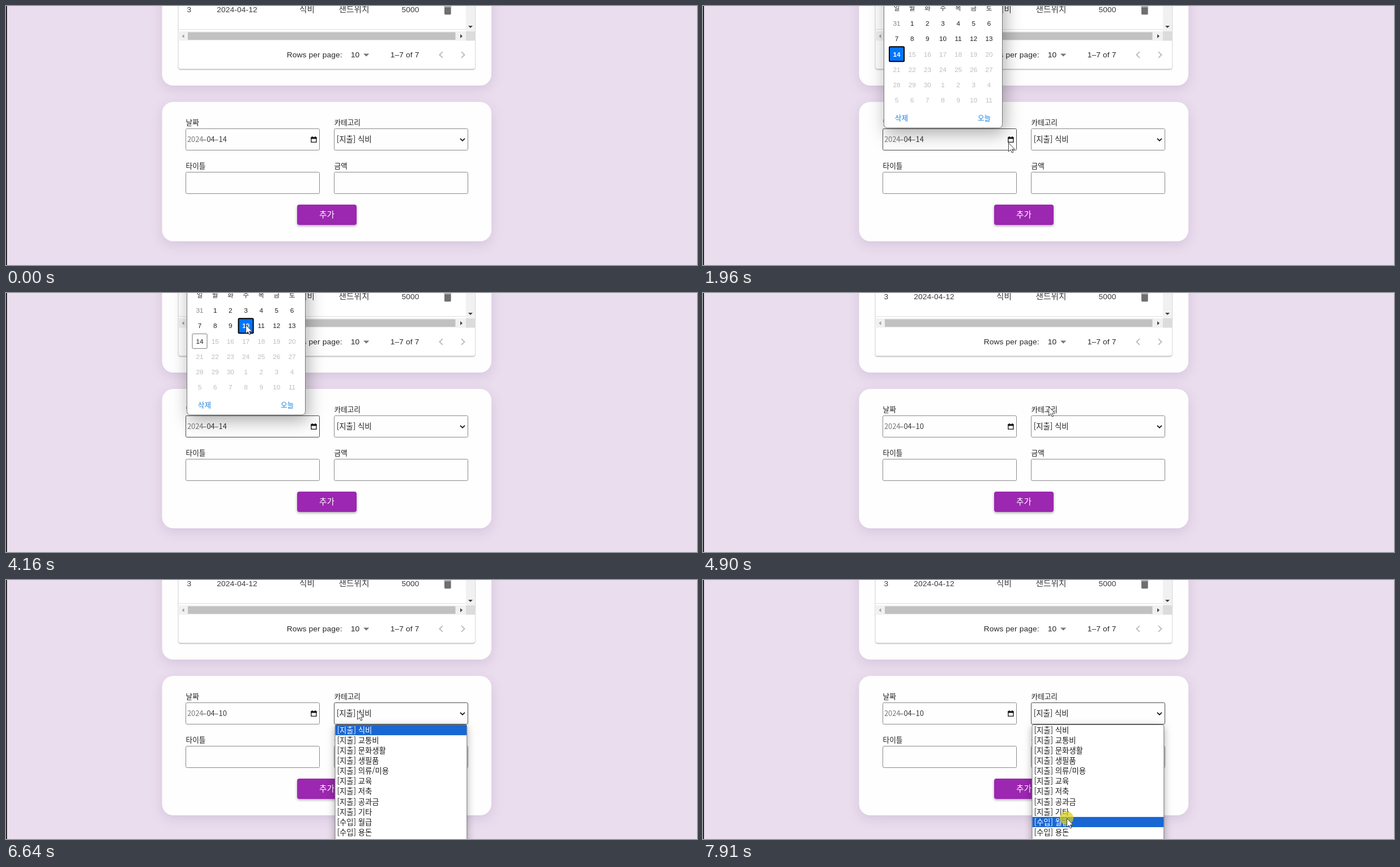
These frames come from a looping animation (1220x459 px, 8000 ms). An HTML page:

```html
<!DOCTYPE html>
<html lang="ko">
<head>
<meta charset="utf-8">
<title>가계부</title>
<style>
  html, body { margin: 0; width: 100%; height: 100%; overflow: hidden; background: #eadded; }
  svg { display: block; }
  text { font-family: "Noto Sans CJK KR", "Noto Sans CJK", sans-serif; font-size: 13.33px; fill: #1c1c1c; white-space: pre; }
  .ui { font-family: "Liberation Sans", Arial, sans-serif; font-size: 13.7px; letter-spacing: .01071em; fill: #262626; }
  .cell { font-size: 14.6px; letter-spacing: .15px; fill: #3a3a3a; }
  .row { fill: #3a3a3a; }
  .label { font-size: 12.6px; }
  .date { font-size: 12.8px; font-weight: 300; fill: #333; }
  .day { font-family: "Liberation Sans", Arial, sans-serif; font-size: 11.7px; text-anchor: middle; }
  .week { font-size: 11.6px; text-anchor: middle; fill: #333; }
  .link { font-size: 12.6px; fill: #1e82dc; }
  .card { fill: #fefefe; filter: drop-shadow(0 6px 10px rgba(80, 40, 120, .13)); }
  .paper { fill: #fff; filter: drop-shadow(0 1px 1px rgba(0, 0, 0, .4)); }
  .button { fill: #9c27b0; filter: drop-shadow(0 2px 2px rgba(0, 0, 0, .32)); }
  .field { fill: #fefefe; stroke: #8a8a8a; }
  .popup { fill: #fff; stroke: #777; }
  #calendar { filter: drop-shadow(4px 10px 15px rgba(0, 0, 0, .32)); }
  #dropdown { filter: drop-shadow(0 4px 7px rgba(0, 0, 0, .32)); }
</style>
</head>
<body>
<svg id="stage" width="1220" height="459" viewBox="0 0 1220 459">
  <rect width="1220" height="459" fill="#eadded"/>
  <rect width="1.6" height="459" fill="#000"/>

  <rect class="card" x="275.5" y="-60" width="581.5" height="201" rx="20"/>
  <rect class="paper" x="304.5" y="-40" width="523.5" height="151.5" rx="4"/>
  <text class="ui row" x="319.6" y="11">3</text>
  <text class="ui row" x="372.3" y="11">2024-04-12</text>
  <text class="cell" x="518" y="11">식비</text>
  <text class="cell" x="587.4" y="11">샌드위치</text>
  <text class="ui row" x="698.4" y="11">5000</text>
  <path transform="translate(768.2 -5) scale(.97)" fill="#6f6f6f"
    d="M6 19c0 1.1.9 2 2 2h8c1.1 0 2-.9 2-2V7H6zM19 4h-3.5l-1-1h-5l-1 1H5v2h14z"/>
  <path d="M304.5 41.5H812" stroke="#e0e0e0"/>
  <path d="M812 0h16v45h-16zM304.5 45H812v16.5H304.5z" fill="#f1f1f1"/>
  <rect x="812" y="45" width="16" height="16.5" fill="#dcdcdc"/>
  <rect x="321" y="46.5" width="472.5" height="13.5" fill="#c1c1c1"/>
  <path d="M314.5 50v7l-4-3.5z" fill="#a3a3a3"/>
  <path d="M802 50v7l4-3.5zM816 35h8l-4 4z" fill="#404040"/>
  <text class="ui" x="495.8" y="91.3">Rows per page:</text>
  <text class="ui" x="608.8" y="91">10</text>
  <path d="M631 84.5h10.2l-5.1 5z" fill="#757575"/>
  <text class="ui" x="678.8" y="91.3">1–7 of 7</text>
  <path d="M771 81.2l-5.6 5.3 5.6 5.3M804 81.2l5.6 5.3-5.6 5.3" fill="none" stroke="#bababa" stroke-width="1.8"/>

  <rect class="card" x="275.5" y="170" width="581.5" height="247" rx="20"/>
  <text class="label" x="317.6" y="211.4">날짜</text>
  <text class="label" x="579.6" y="211.4">카테고리</text>
  <text class="label" x="317.6" y="287.8">타이틀</text>
  <text class="label" x="579.6" y="287.8">금액</text>
  <g id="fields"></g>
  <text class="date" y="241.3"><tspan x="320" fill="#777">2024</tspan><tspan x="347.3">–</tspan><tspan x="354.4">04</tspan><tspan x="368.3">–</tspan><tspan id="dayPart" x="375.6">14</tspan></text>
  <path d="M538.9 233.2h9v8.2h-9z" fill="none" stroke="#111" stroke-width="1.3"/>
  <path d="M538.3 232.4h10.2v3h-10.2zM540 231h1.4v2H540zM545.4 231h1.4v2h-1.4z" fill="#111"/>
  <text x="583.8" y="241">[지출] 식비</text>
  <path d="M802 234.8l4 4 4-4" fill="none" stroke="#111" stroke-width="1.8"/>
  <rect class="button" x="514" y="352" width="105" height="36" rx="4"/>
  <text class="cell" x="566.5" y="374.8" text-anchor="middle" style="fill:#fff">추가</text>

  <g id="calendar">
    <rect class="popup" x="319.5" y="-60" width="209" height="276" rx="6"/>
    <text class="link" x="338.8" y="203">삭제</text>
    <text class="link" x="485" y="203">오늘</text>
  </g>
  <g id="dropdown"><rect class="popup" x="581" y="256.5" width="232.8" height="230" rx="3"/></g>
  <circle id="press" r="12" fill="#d8ce14" fill-opacity=".72"/>
  <path id="cursor" d="M.5.5V16l3.6-3.3 2.3 5.4 2.4-1-2.3-5.2h4.9z" fill="#fff" stroke="#2a2a2a" stroke-width=".9" stroke-linejoin="round"/>
</svg>
<script>
const LOOP = 8000;
const ROW_TOP = 257, ROW_H = 18.1;
const CELL = 27.17, COL_X = 342, DAY_Y = 31;
const TODAY = 14, PICK = 10;

const $ = id => document.getElementById(id);
function add(parent, tag, attrs, text) {
  const el = document.createElementNS('http://www.w3.org/2000/svg', tag);
  for (const key in attrs) el.setAttribute(key, attrs[key]);
  if (text !== undefined) el.textContent = text;
  parent.appendChild(el);
  return el;
}
const show = (el, on) => el.setAttribute('visibility', on ? 'visible' : 'hidden');

const [dateField, selectField] = [[317.5, 217.5], [579.5, 217.5], [317.5, 294.5], [579.5, 294.5]]
  .map(([x, y]) => add($('fields'), 'rect', { class: 'field', x, y, width: 236, height: 38, rx: 2 }));

[...'일월화수목금토'].forEach((name, i) =>
  add($('calendar'), 'text', { class: 'week', x: COL_X + i * CELL, y: 7.5 }, name));

// Cell n holds day n of the month; cell 0 is the last day before it.
const days = Array.from({ length: 42 }, (_, n) => {
  const x = COL_X + (n % 7) * CELL, y = DAY_Y + Math.floor(n / 7) * CELL;
  const box = add($('calendar'), 'rect', { x: x - 13, y: y - 13, width: 26, height: 26, rx: 1.5 });
  const label = add($('calendar'), 'text', { class: 'day', x, y: y + 4.2 }, n === 0 ? 31 : n > 30 ? n - 30 : n);
  return { n, x, y, box, label };
});

const options = ['식비', '교통비', '문화생활', '생필품', '의류/미용', '교육', '저축', '공과금', '기타', '월급', '용돈']
  .map((name, i) => {
    const y = ROW_TOP + i * ROW_H;
    const bar = add($('dropdown'), 'rect', { x: 581.5, y, width: 231.8, height: ROW_H, fill: '#1967d2' });
    const label = add($('dropdown'), 'text', { x: 584.5, y: y + 13.8 }, `[${i < 9 ? '지출' : '수입'}] ${name}`);
    return { bar, label };
  });

const smooth = u => u * u * (3 - 2 * u);
const brisk = u => .6 * smooth(u) + .4 * u;
const out = u => u * (2 - u);

// start, end, target x, target y, easing
const moves = [
  [580, 1370, 539, 242, smooth],
  [2570, 3100, 427, 37, smooth],
  [3100, 3350, 424, 50, smooth],
  [3450, 3580, 423, 56, smooth],
  [4570, 4900, 610, 201, brisk],
  [4900, 5300, 620, 231, out],
  [6640, 7100, 643, 386, brisk],
  [7100, 7430, 643, 421, out],
  [7450, 7490, 642, 422, smooth]
];
const presses = [[1650, 1860], [3950, 4160], [5540, 5780], [7910, LOOP]];

function pointer(t) {
  let x = 1102, y = 455;
  for (const [start, end, toX, toY, ease] of moves) {
    if (t < start) break;
    const k = ease(Math.min(1, (t - start) / (end - start)));
    x += (toX - x) * k;
    y += (toY - y) * k;
  }
  return [x, y];
}

// Value of the last [time, value] step reached.
const stepAt = (t, steps) => steps.reduce((v, [at, value]) => t >= at ? value : v, 0);

function setFade(el, opacity) {
  show(el, opacity > 0);
  el.setAttribute('opacity', opacity);
}

function drawDays(t, px, py) {
  const selected = t < 4160 ? TODAY : PICK;
  for (const { n, x, y, box, label } of days) {
    const isSelected = n === selected;
    const isHover = t >= 2570 && n > 0 && n <= TODAY &&
      Math.abs(px - x) < CELL / 2 && Math.abs(py - y) < CELL / 2;
    box.setAttribute('fill', isSelected ? '#0075ff' : isHover ? '#efefef' : 'none');
    box.setAttribute('stroke', isSelected ? '#000' : n === TODAY ? '#767676' : 'none');
    box.setAttribute('stroke-width', isSelected ? 2 : 1);
    label.style.fill = isSelected ? '#fff' : n === 0 ? '#858585' : n > TODAY ? '#bdbdbd' : '#1c1c1c';
    label.style.fontWeight = isSelected ? 'bold' : 'normal';
  }
}

function draw(t) {
  const [px, py] = pointer(t);
  const over = left => py >= 217 && py <= 256 && px >= left && px <= left + 237;

  show($('cursor'), t >= 580);
  $('cursor').setAttribute('transform', `translate(${px} ${py})`);
  show($('press'), presses.some(([from, to]) => t >= from && t < to));
  $('press').setAttribute('cx', px);
  $('press').setAttribute('cy', py);

  const dateActive = t < 4250 && (t >= 1650 || over(317));
  const selectActive = t >= 5540 || over(579);
  dateField.style.stroke = dateActive ? '#4a4a4a' : '';
  selectField.style.stroke = selectActive ? '#4a4a4a' : '';
  $('dayPart').textContent = t < 4250 ? TODAY : PICK;

  setFade($('calendar'), stepAt(t, [[1860, .35], [1910, .7], [1960, 1], [4250, .4], [4270, 0]]));
  drawDays(t, px, py);

  setFade($('dropdown'), stepAt(t, [[5540, .35], [5585, .7], [5630, 1]]));
  const active = Math.max(0, Math.floor((py - ROW_TOP) / ROW_H));
  options.forEach(({ bar, label }, i) => {
    bar.setAttribute('fill-opacity', i === active ? 1 : 0);
    label.style.fill = i === active ? '#fff' : '';
  });
}

const began = performance.now();
function tick() {
  draw((performance.now() - began) % LOOP);
  requestAnimationFrame(tick);
}
tick();
</script>
</body>
</html>
```
